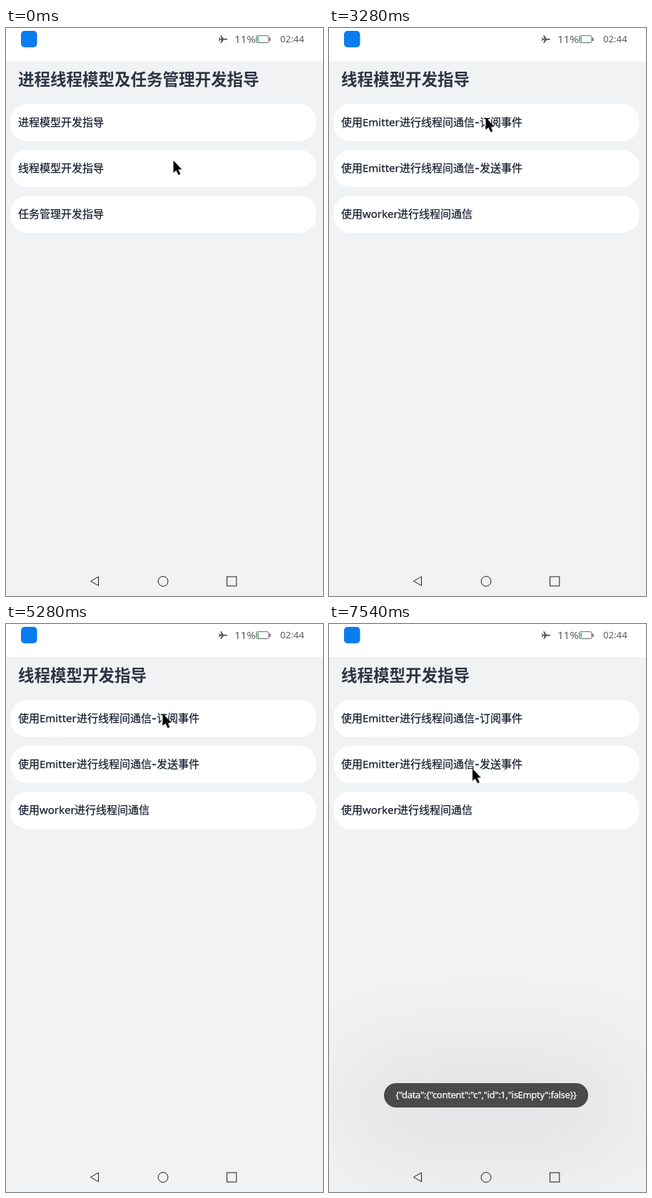
Recreate the animation shown at these times as an HTML page. Size 444 by 793 pixels, loop 8000 ms.

```html
<!DOCTYPE html>
<html lang="zh-CN">
<head>
<meta charset="utf-8">
<title>线程模型开发指导</title>
<style>
  html, body { margin: 0; width: 100%; height: 100%; overflow: hidden; background: #f1f2f4; }
  .stage { position: relative; width: 444px; height: 793px; overflow: hidden; }
  svg { position: absolute; left: 0; top: 0; }
  text { font-family: "Noto Sans", "Noto Sans CJK SC", "Noto Sans CJK", sans-serif; }
  .title { font-size: 22.5px; font-weight: 700; fill: #2d3443; }
  .item { font-size: 15px; font-weight: 500; fill: #182030; stroke: #182030; stroke-width: .25; }
  .dash { font-family: Inter, sans-serif; }
  .note { font-size: 13.1px; font-weight: 500; fill: #fff; stroke: #fff; stroke-width: .25; }
  .json { letter-spacing: -.36px; }
  .status { fill: #5c5c5c; }
  .line { fill: none; stroke: #1c1c1c; }

  .toast {
    position: absolute; top: 641px; height: 33.5px; border-radius: 17px;
    background: #4a4a4a; box-shadow: 0 14px 130px 60px rgba(0, 0, 0, .065);
  }
  .short { left: 130px; width: 180px; }
  .long { left: 77px; width: 286px; }

  .home, .topic, .first, .second, .cursor {
    animation: 8s step-end infinite;
  }
  .home { animation-name: home; }
  .topic { animation-name: topic; }
  .first { animation-name: first; }
  .second { animation-name: second; }
  .cursor { animation-name: point; }

  @keyframes home { 0% { opacity: 1 } 28.875%, 100% { opacity: 0 } }
  @keyframes topic { 0% { opacity: 0 } 28.875%, 100% { opacity: 1 } }
  @keyframes first { 0% { opacity: 0 } 50% { opacity: 1 } 66%, 100% { opacity: 0 } }
  @keyframes second { 0% { opacity: 0 } 94.25%, 100% { opacity: 1 } }
  @keyframes point {
    0% { transform: translate(234px, 185px) }
    16.375% { transform: translate(219px, 193px) }
    33.875% { transform: translate(216px, 153px) }
    37.375% { transform: translate(219px, 133px) }
    41% { transform: translate(219px, 125px) }
    69.5% { transform: translate(206px, 154px) }
    73% { transform: translate(204px, 166px) }
    74.75% { transform: translate(200px, 182px) }
    78.25% { transform: translate(200px, 193px) }
    81.75%, 100% { transform: translate(200.5px, 202px) }
  }
</style>
</head>
<body>
<div class="stage">
  <div class="toast short first"></div>
  <div class="toast long second"></div>

  <svg width="444" height="793" viewBox="0 0 444 793">
    <!-- status bar -->
    <rect width="444" height="46" fill="#fff"/>
    <rect x="21" y="4" width="22.5" height="23" rx="5" fill="#0a7cf0"/>
    <path class="status" d="M310.3 15.7q-.6-1-2.2-1h-3.2L301.6 10.3h-1.5l1.6 4.4h-1.7l-1.2-1.5h-1l.8 2.5-.8 2.5h1l1.2-1.5h1.7l-1.6 4.4h1.5l3.3-4.4h3.2q1.6 0 2.2-1z"/>
    <text class="status" x="320" y="21" font-size="15">11%</text>
    <rect x="350.5" y="10.7" width="17.3" height="9.8" rx="2" fill="none" stroke="#666"/>
    <rect x="351.7" y="11.9" width="2.3" height="7.4" fill="#5fd06a"/>
    <rect x="368.8" y="13.2" width="1.6" height="5" rx=".8" fill="#555"/>
    <text class="status" x="384" y="20.3" font-size="13.2">02:44</text>

    <!-- cards -->
    <g fill="#fff">
      <rect x="6" y="106" width="428.5" height="52" rx="24"/>
      <rect x="6" y="170" width="428.5" height="52" rx="24"/>
      <rect x="6" y="234" width="428.5" height="52" rx="24"/>
    </g>

    <g class="home">
      <text class="title" x="17" y="80.2">进程线程模型及任务管理开发指导</text>
      <g class="item">
        <text x="17" y="137">进程模型开发指导</text>
        <text x="17" y="201">线程模型开发指导</text>
        <text x="17" y="265">任务管理开发指导</text>
      </g>
    </g>

    <g class="topic">
      <text class="title" x="17" y="80.2">线程模型开发指导</text>
      <g class="item">
        <text x="17" y="137">使用<tspan x="47">Emitter</tspan><tspan x="99">进行线程间通信</tspan><tspan class="dash" x="204">-</tspan><tspan x="211">订阅事件</tspan></text>
        <text x="17" y="201">使用<tspan x="47">Emitter</tspan><tspan x="99">进行线程间通信</tspan><tspan class="dash" x="204">-</tspan><tspan x="211">发送事件</tspan></text>
        <text x="17" y="265">使用<tspan x="47">worker</tspan><tspan x="96">进行线程间通信</tspan></text>
      </g>
    </g>

    <!-- toast messages -->
    <text class="note first" x="145" y="662.3">成功使用<tspan x="197.5">Emitter</tspan><tspan x="242.5">订阅事件</tspan></text>
    <text class="note json second" x="220" y="662.3" text-anchor="middle">{"data":{"content":"c","id":1,"isEmpty":false}}</text>

    <!-- navigation bar -->
    <g class="line">
      <path d="M118.5 772.3L129.5 766v12.6z"/>
      <circle cx="220" cy="772.5" r="6.9"/>
      <rect x="309.5" y="766" width="13.3" height="13"/>
    </g>

    <path class="cursor" d="M.5 0V17.2L4.3 13.7 7.5 20.3 10.3 19 7.3 12.5H12.3z"/>
  </svg>
</div>
</body>
</html>
```
